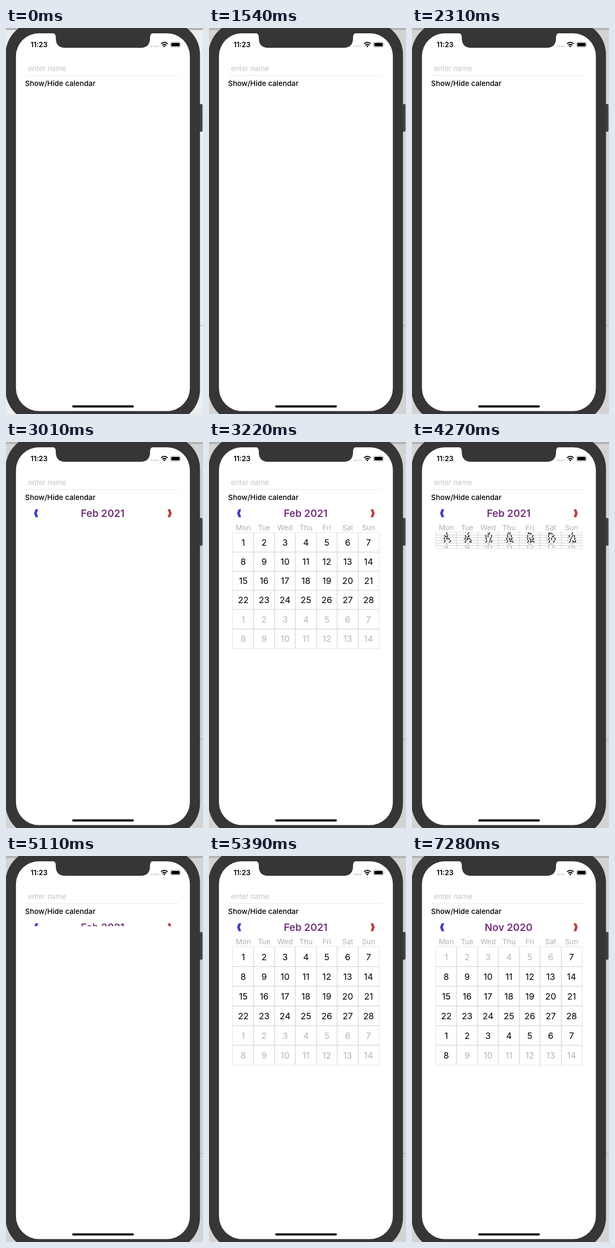
These frames come from a looping animation (372 px wide and 726 px high, 8 s). An HTML page:

```html
<!DOCTYPE html>
<html lang="en">
<head>
<meta charset="utf-8">
<title>Calendar toggle</title>
<style>
  html, body { margin: 0; width: 100%; height: 100%; overflow: hidden; background: #fff; }
  #stage { position: relative; width: 372px; height: 726px; overflow: hidden;
    font-family: Inter, Roboto, sans-serif; }
  #stage > svg { position: absolute; left: 0; top: 0; }
  .label { position: absolute; line-height: 20px; white-space: nowrap; }
  #cal { position: absolute; left: 33px; top: 113px; width: 300px; overflow: hidden; }
  #title { left: 0; width: 299px; top: 12px; text-align: center;
    font-size: 19px; font-weight: 600; color: #73327a; }
  #cal svg { position: absolute; left: 0; top: 0; }
  .week, #grid { position: absolute; left: 12px; width: 276px; display: grid;
    grid-template-columns: repeat(7, 1fr); }
  .week { top: 38px; font-size: 13.7px; line-height: 20px; text-align: center; color: #b0b0b0; }
  #grid { grid-template-rows: repeat(6, minmax(0, 1fr)); font-size: 16.5px; line-height: 20px; }
  #grid div { display: flex; align-items: center; justify-content: center; overflow: hidden;
    min-height: 0; box-shadow: 0 0 0 .8px #dedede; }
</style>
</head>
<body>
<div id="stage">
  <svg width="372" height="726" viewBox="0 0 372 726">
    <rect id="desk" width="372" height="726"/>
    <rect width="372" height="4" fill="#b4b4b4"/>
    <path d="M366 559.5H372" stroke="#a2a2a2"/>
    <rect x="363" y="143" width="8" height="52" rx="2" fill="#434343"/>
    <rect x="-1" y="-12" width="367.3" height="754" rx="62" fill="#363636"/>
    <rect x="18.8" y="10" width="328.4" height="710.4" rx="43" fill="#fff"/>
    <path d="M88 9.5Q94 10.5 94 17V19Q94 37.2 112 37.2H254Q272 37.2 272 19V17Q272 10.5 278 9.5Z" fill="#363636"/>
    <g fill="#cdcdcd">
      <circle cx="274.8" cy="34.5" r="1.5"/><circle cx="278.8" cy="34.5" r="1.5"/>
      <circle cx="282.8" cy="34.5" r="1.5"/><circle cx="286.8" cy="34.5" r="1.5"/>
    </g>
    <g fill="none" stroke="#000" stroke-width="2">
      <path d="M292.8 29.8Q299 24.2 305.2 29.8"/>
      <path d="M295.2 32.6Q299 29.2 302.8 32.6"/>
    </g>
    <path d="M296.9 34.2Q299 32.4 301.1 34.2L299 36.4Z"/>
    <rect x="310.5" y="26.5" width="19" height="9.5" rx="2.8" fill="none" stroke="#a8a8a8"/>
    <rect x="312" y="28" width="16" height="6.5" rx="1.5"/>
    <path d="M331 29.8Q332.4 31.2 331 32.8Z" fill="#a8a8a8"/>
    <rect x="36.5" y="61.5" width="291" height="28" rx="4" fill="none" stroke="#fbfbfb"/>
    <path d="M37 89.5H327" stroke="#ebebeb"/>
    <rect x="125" y="709.7" width="116.5" height="4" rx="2"/>
  </svg>
  <div class="label" style="left:46.5px;top:21px;font-size:13.1px;font-weight:600">11:23</div>
  <div class="label" style="left:41.5px;top:66px;font-size:13.5px;color:#c4c4c6">enter name</div>
  <div class="label" style="left:36px;top:94px;font-size:13.75px;font-weight:500">Show/Hide calendar</div>
  <div id="cal">
    <svg width="300" height="40" viewBox="33 113 300 40">
      <path id="prev" d="M55.8 126.5H60.8L58.2 134L60.8 141.5H55.8L53 134Z" fill="#3d3dc6"/>
      <path d="M310.2 126.5H305.2L307.8 134L305.2 141.5H310.2L313 134Z" fill="#b5453f"/>
    </svg>
    <div class="label" id="title"></div>
    <div class="week"></div>
    <div id="grid"></div>
  </div>
</div>
<script>
const LOOP = 8000, STEP = 70, SLIDE = 300;
const CAL_TOP = 113, CAL_HEIGHT = 281;
const $ = id => document.getElementById(id);

// title, index of the first active cell, number of days
const months = [
  ['Feb 2021', 0, 28],
  ['Jan 2021', 4, 31],
  ['Dec 2020', 1, 31],
  ['Nov 2020', 6, 30]
];

// [start time, value]
const desk = [[0, '#ededed'], [1540, '#d3d3d3']];
const month = [[0, 0], [6370, 1], [6860, 2], [7280, 3]];
const prevAlpha = [
  [0, 1], [6230, .3], [6370, .55], [6440, .8], [6510, 1],
  [6790, .3], [6860, .55], [6930, .8], [7000, 1], [7070, .3], [7280, 1]
];
// [start time, from, to]
const slides = [[2944, 0, 1], [4082, 1, 0], [5062, 0, 1]];

const valueAt = (steps, t) => steps.filter(s => s[0] <= t).pop()[1];

function openness(t) {
  const slide = slides.filter(s => s[0] <= t).pop();
  if (!slide) return 0;
  const [start, from, to] = slide;
  const x = Math.min(1, (t - start) / SLIDE);
  return from + (to - from) * x * x * (3 - 2 * x);
}

function addCell(parent, text) {
  const cell = document.createElement('div');
  cell.textContent = text;
  parent.append(cell);
  return cell;
}

const week = document.querySelector('.week');
'Mon Tue Wed Thu Fri Sat Sun'.split(' ').forEach(day => addCell(week, day));
const cells = Array.from({ length: 42 }, (_, i) => addCell($('grid'), i % 28 + 1));

function draw(t) {
  const open = openness(t);
  const height = CAL_HEIGHT * open;
  const top = Math.max(170, 154 + 17 * open) - CAL_TOP;
  const gridHeight = height - 1 - top;
  $('cal').style.height = height + 'px';
  $('grid').style.top = top + 'px';
  $('grid').style.height = Math.max(0, gridHeight) + 'px';
  $('grid').style.visibility = gridHeight > 0 ? 'visible' : 'hidden';

  const [title, first, days] = months[valueAt(month, t)];
  $('title').textContent = title;
  cells.forEach((cell, i) => {
    cell.style.color = i >= first && i < first + days ? '#000' : '#b6b6b6';
  });
  $('prev').setAttribute('opacity', valueAt(prevAlpha, t));
  $('desk').setAttribute('fill', valueAt(desk, t));
}

const begin = performance.now();
function tick() {
  const t = (performance.now() - begin) % LOOP;
  draw(Math.floor(t / STEP + 1e-6) * STEP);
  requestAnimationFrame(tick);
}
tick();
</script>
</body>
</html>
```
